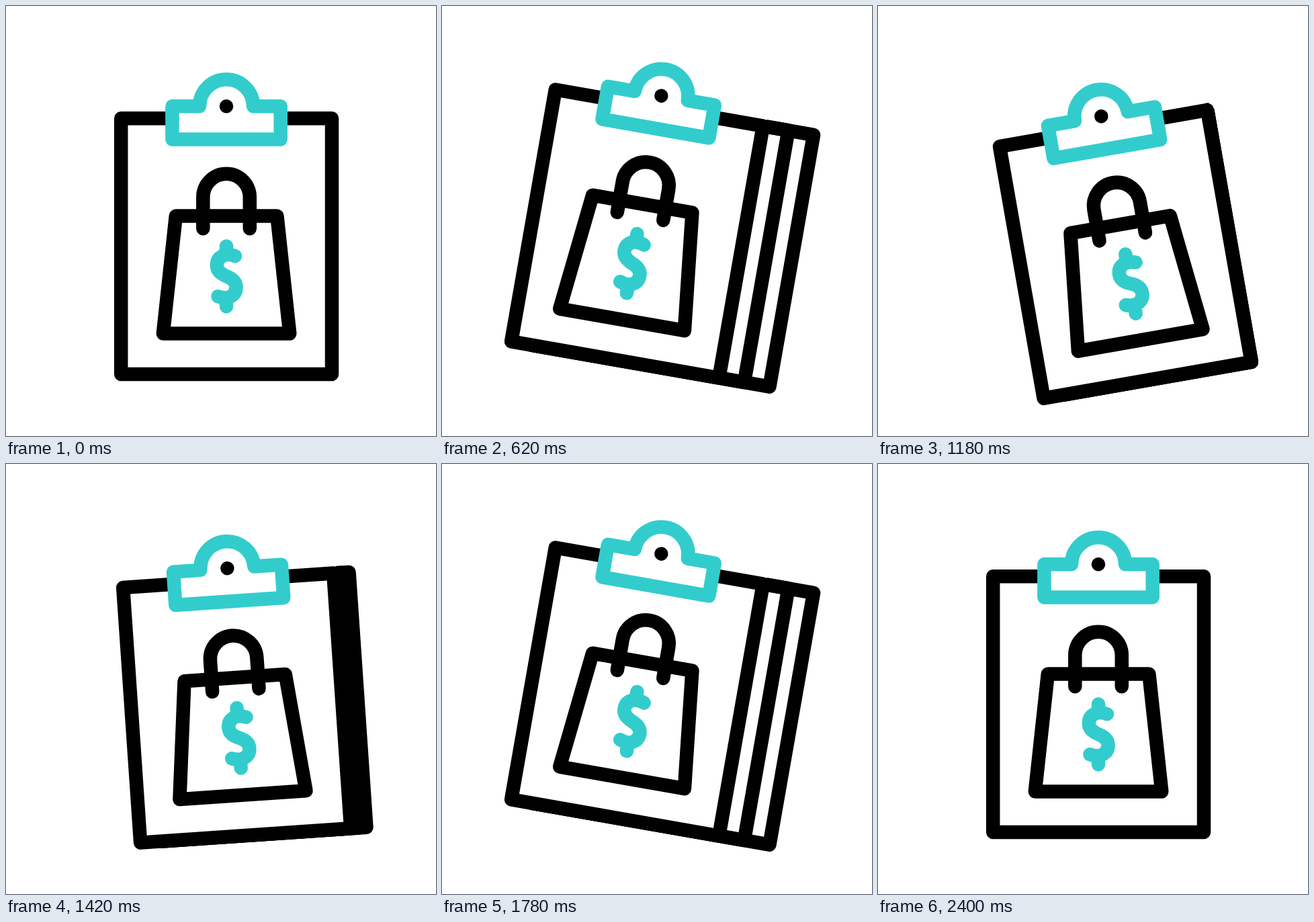
Animation, 640 px wide and 640 px high, one loop 2420 ms. Source, as an HTML page with a canvas:

```html
<!DOCTYPE html>
<html lang="en">
<head>
<meta charset="utf-8">
<title>Order clipboard</title>
<style>
  html, body { margin: 0; width: 100%; height: 100%; overflow: hidden; background: #fff; }
  canvas { display: block; width: 640px; height: 640px; }
</style>
</head>
<body>
<canvas id="stage" width="640" height="640"></canvas>
<script>
const ctx = document.getElementById('stage').getContext('2d');

const LOOP = 2420, STEP = 20, SWING = 600;
const BLACK = '#000', TEAL = '#33cccc', WHITE = '#fff';
const PIVOT = { x: 416.3, y: 132 };
const BOARD = { left: 171.2, right: 485, top: 167.3, bottom: 547.9 };
const ANGLES = [0, 10, -10, 10, 0];
const SPREADS = [0, 76.6, 0, 76.6, 0];

const board = new Path2D(
  `M${BOARD.left} ${BOARD.top}H${BOARD.right}V${BOARD.bottom}H${BOARD.left}Z`);
const clip = new Path2D('M247.4 149.2H288A40 40 0 0 1 368 149.2H408.7V198.6H247.4Z');
const bag = new Path2D('M252.8 312.6H403.4L422.3 487.5H233.8Z');
const handle = new Path2D('M293.3 331.2V284.5A34.75 34.75 0 0 1 362.8 284.5V331.2');
const dollar = new Path2D(
  'M341 372.2C326.5 366.5 313.8 373 313.8 385.8C313.8 393 319 398.5 328.2 402.2' +
  'C337.4 405.9 342.6 411.4 342.6 418.6C342.6 431.4 329.9 437.9 315.4 432.2' +
  'M328 357.6V368M328 436V447.2');
const pin = new Path2D();
pin.arc(328, 149.2, 10.25, 0, Math.PI * 2);

function draw(path, color, fill, cap = 'round') {
  if (fill) {
    ctx.fillStyle = fill;
    ctx.fill(path);
  }
  ctx.strokeStyle = color;
  ctx.lineCap = cap;
  ctx.stroke(path);
}

function sheetEdge(offset) {
  const right = BOARD.right + offset;
  draw(new Path2D(`M489 ${BOARD.top}H${right}V${BOARD.bottom}H200`), BLACK, null, 'butt');
}

// Eases between evenly spaced keys with zero speed at each key.
function keyed(values, time) {
  const pos = Math.min(time / SWING, values.length - 1);
  const i = Math.min(Math.floor(pos), values.length - 2);
  const p = pos - i;
  return values[i] + (values[i + 1] - values[i]) * p * p * (3 - 2 * p);
}

function render(time) {
  const spread = keyed(SPREADS, time);
  ctx.fillStyle = WHITE;
  ctx.fillRect(0, 0, 640, 640);

  ctx.save();
  ctx.translate(PIVOT.x, PIVOT.y);
  ctx.rotate(keyed(ANGLES, time) * Math.PI / 180);
  ctx.translate(-PIVOT.x, -PIVOT.y);
  ctx.lineWidth = 20.5;
  ctx.lineJoin = 'round';

  if (spread > 0) {
    sheetEdge(spread);
    sheetEdge(spread / 2);
  }
  draw(board, BLACK, WHITE);
  draw(clip, TEAL, WHITE);
  ctx.fillStyle = BLACK;
  ctx.fill(pin);
  draw(bag, BLACK);
  draw(handle, BLACK);
  draw(dollar, TEAL);
  ctx.restore();
}

const start = performance.now();
function tick() {
  const elapsed = (performance.now() - start) % LOOP;
  render(Math.floor(elapsed / STEP) * STEP);
  requestAnimationFrame(tick);
}
tick();
</script>
</body>
</html>
```
